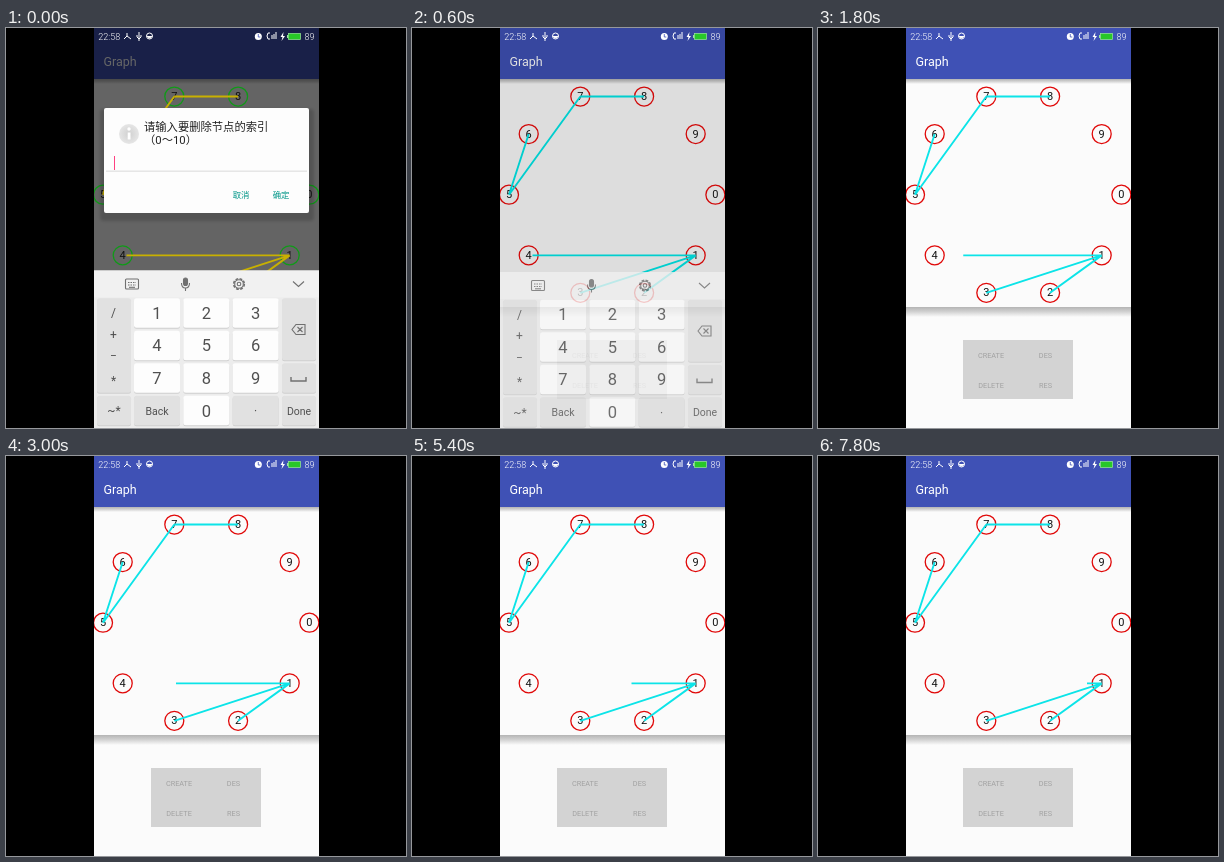
An HTML page for the animation above (8 s loop, 400 by 400 pixels).

```html
<!DOCTYPE html>
<html lang="en">
<head>
<meta charset="utf-8">
<title>Graph</title>
<style>
html, body { margin: 0; width: 100%; height: 100%; overflow: hidden; background: #000; }
svg { display: block; width: 100vw; height: 100vh; }
text { font-family: Roboto, "Noto Sans CJK SC", "Noto Sans CJK", sans-serif; }
.icon { fill: none; stroke: #707070; stroke-width: 1.1; }
</style>
</head>
<body>
<svg id="stage" viewBox="0 0 400 400"></svg>
<script>
const LOOP = 8000, STEP = 200;

const rect = (x, y, w, h, fill, more = '') =>
  `<rect x="${x}" y="${y}" width="${w}" height="${h}" fill="${fill}" ${more}/>`;
const label = (x, y, size, fill, value, more = '') =>
  `<text x="${x}" y="${y}" font-size="${size}" fill="${fill}" ${more}>${value}</text>`;
const centered = (x, y, size, fill, value) =>
  label(x, y, size, fill, value, 'text-anchor="middle"');

const nodes = Array.from({ length: 10 }, (_, i) => {
  const angle = i * Math.PI / 5;
  return { x: 200.2 + 103.2 * Math.cos(angle), y: 166.7 + 103.2 * Math.sin(angle) };
});
const edges = [[6, 5], [5, 7], [7, 8], [1, 3], [1, 2]];

function graph(time, ring, line) {
  const circles = nodes.map(({ x, y }, i) =>
    `<circle cx="${x}" cy="${y}" r="9.5" fill="none" stroke="${ring}" stroke-width="1.3"/>` +
    centered(x, y + 3.6, 11, '#111', i)).join('');
  const segment = (x1, y1, x2, y2) => `M${x1} ${y1}L${x2} ${y2}`;
  const path = edges.map(([a, b]) =>
    segment(nodes[a].x, nodes[a].y, nodes[b].x, nodes[b].y)).join('');
  // The deleted edge shrinks steadily towards node 1.
  const tail = Math.max(120.5, 170 + (time - 3000) * 0.020625);
  const shrinking = segment(tail, nodes[1].y, nodes[1].x, nodes[1].y);
  return circles + `<path d="${path}${shrinking}" stroke="${line}" stroke-width="1.9" fill="none"/>`;
}

const page = `
  <defs>
    <linearGradient id="shade" x2="0" y2="1">
      <stop stop-color="#b4b4b4"/><stop offset=".45" stop-color="#d0d0d0"/>
      <stop offset="1" stop-color="#fbfbfb"/>
    </linearGradient>
    <radialGradient id="badge"><stop stop-color="#d0d0d0"/><stop offset="1" stop-color="#e6e6e6"/></radialGradient>
    <filter id="blur"><feGaussianBlur stdDeviation="1.5"/></filter>
    <clipPath id="screen"><rect x="88" width="225" height="400"/></clipPath>
  </defs>` +
  rect(88, 0, 225, 400, '#fbfbfb') +
  rect(88, 51, 225, 5, 'url(#shade)') +
  rect(88, 279, 225, 10, 'url(#shade)') +
  rect(88, 0, 225, 51, '#3f51b5') +
  label(97.5, 38.3, 12.5, '#fff', 'Graph') +
  rect(145, 312, 110, 59, '#d3d3d3') +
  [['CREATE', 173, 330], ['DES', 227.5, 330], ['DELETE', 173, 359.5], ['RES', 227.5, 359.5]]
    .map(([word, x, y]) => centered(x, y, 7.3, '#a2a2a2', word)).join('');

const statusBar =
  label(92.3, 11.6, 9, '#fff', '22:58', 'font-weight="300"') +
  label(298.5, 11.6, 9, '#fff', '89', 'font-weight="300"') +
  `<g fill="none" stroke="#fff">
    <path d="M118 11l3-3 4 3M121 8V5M133 4v9M131 7v2l2 2 2-2V7"/>
    <circle cx="143.5" cy="8" r="3"/><path d="M141 8q2.500 4 5 0" fill="#fff"/>
    <path d="M264 5h-2q-2 3 0 6h2M266 11V7M268 11V6M270 11V4"/>
  </g>
  <circle cx="252.300" cy="8.500" r="3.500" fill="#fff"/>
  <path d="M252.300 6v3h2" fill="none" stroke="#3f51b5" stroke-width=".8"/>
  <path d="M277.500 4l-3 5h2l-1 4 3.500-5h-2z" fill="#fff"/>` +
  rect(282.5, 5.5, 12, 6, '#28c828', 'stroke="#9be89b" stroke-width=".7"') +
  rect(281, 7, 1.2, 3, '#9be89b');

const key = (x, y, w, h, fill) =>
  rect(x, y + 1, w, h, '#cfcfcf', 'rx="2.5"') + rect(x, y, w, h, fill, 'rx="2.5"');

function buildKeyboard() {
  const columns = [128, 177.3, 226.6], rows = [270.3, 302.8, 335.3, 367.8];
  const gray = '#e1e1e1', white = '#fdfdfd', ink = '#505050', w = 46, h = 29.5;
  let out = rect(88, 242.5, 225, 158, '#ececec') + rect(88, 242.5, 225, 27, '#f1f1f1');
  for (let i = 0; i < 9; i++) {
    const x = columns[i % 3], y = rows[Math.floor(i / 3)];
    out += key(x, y, w, h, white) + centered(x + w / 2, y + 20.6, 16.5, ink, i + 1);
  }
  out += key(91, rows[0], 34, 94.5, gray);
  ['/', '+', '−', '*'].forEach((sign, i) => {
    out += centered(107.5, 289 + i * 21.7 + (sign === '*' ? 2.5 : 0), 12, ink, sign);
  });
  out += key(276, rows[0], 34, 62, gray) + key(276, rows[2], 34, h, gray);
  const bottom = [
    [91, 34, gray, '~*', 12], [128, w, gray, 'Back', 10.5], [177.3, w, white, '0', 16.5],
    [226.6, w, gray, '·', 12], [276, 34, gray, 'Done', 10.5]
  ];
  for (const [x, width, fill, word, size] of bottom) {
    out += key(x, rows[3], width, h, fill) +
      centered(x + width / 2, 383 + size * 0.36, size, ink, word);
  }
  return out + `<g class="icon">
    <rect x="119.500" y="251" width="13" height="10" rx="1"/>
    <path d="M122 254.500h8M122 257h8" stroke-dasharray="1.500 1"/><path d="M123 259.300h6"/>
    <rect x="177.500" y="250" width="4" height="7.500" rx="2" fill="#707070"/>
    <path d="M175.500 255q0 5 4 5t4-5M179.500 260v3"/>
    <circle cx="233" cy="256" r="5.300" stroke-dasharray="2.700 1.460" stroke-width="1.600"/>
    <circle cx="233" cy="256" r="4.300"/><circle cx="233" cy="256" r="1.800"/>
    <path d="M287 253.500l5.500 5 5.500-5"/>
    <path d="M286 301.500l4-5h9v10h-9zM291.500 299l5 5M296.500 299l-5 5"/>
    <path d="M285 349v4h15v-4" stroke-width="1.400"/>
  </g>`;
}
const keyboard = buildKeyboard();

function dialog(top, typed) {
  const entry = typed
    ? label(107.5, 59, 11, '#222', typed)
    : rect(108, 48, 1, 14, '#ff4081');
  return `<g transform="translate(0 ${top})">` +
    rect(94, 1, 214, 112, '#000', 'opacity=".16" rx="4" filter="url(#blur)"') +
    rect(98, 0, 205, 105, '#fdfdfd', 'rx="2"') +
    `<circle cx="123" cy="26" r="10" fill="url(#badge)"/>` +
    rect(121.7, 24.5, 2.8, 7, '#fff') +
    `<circle cx="123" cy="21" r="1.700" fill="#fff"/>` +
    label(138, 23.3, 11.3, '#222', '请输入要删除节点的索引') +
    label(138, 36.3, 11.3, '#222', '（0～10）') +
    entry + rect(100, 62.7, 201, 0.8, '#cfcfcf') +
    centered(235, 90.2, 8.4, '#009688', '取消') +
    centered(275, 90.2, 8.4, '#009688', '确定') + '</g>';
}

function render(time) {
  const asking = time < 600, closing = time === 600;
  const dim = asking ? 0.6 : closing ? 0.12 : 0;
  let out = page + rect(88, 0, 225, 400, '#000', `opacity="${dim}"`);
  out += asking ? graph(time, '#109a18', '#c8b000')
    : closing ? graph(time, '#d00808', '#00cece')
    : graph(time, '#e00808', '#0ce4e8');
  out += statusBar;
  if (asking) out += dialog(time < STEP ? 80 : 77, time < 2 * STEP ? '' : '1') + keyboard;
  if (closing) out += `<g opacity=".78" transform="translate(0 1.500)">${keyboard}</g>`;
  return `<g clip-path="url(#screen)">${out}</g>`;
}

const stage = document.getElementById('stage');
const start = performance.now();
let shown = -1;
function tick() {
  const elapsed = (performance.now() - start) % LOOP;
  const time = Math.floor(elapsed / STEP) * STEP;
  if (time !== shown) {
    stage.innerHTML = render(time);
    shown = time;
  }
  requestAnimationFrame(tick);
}
tick();
</script>
</body>
</html>
```
